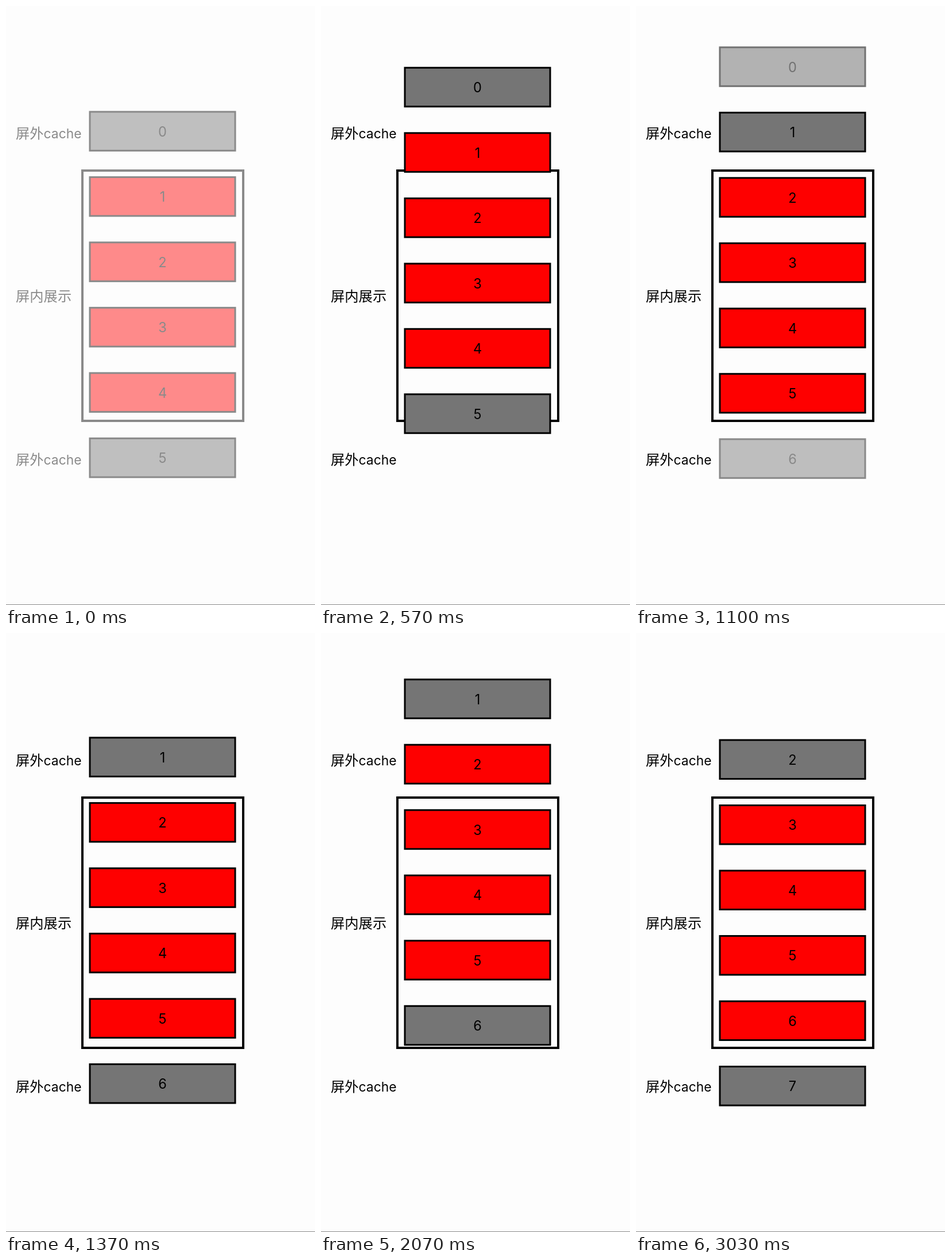
Recreate the animation shown at these times as an HTML page. Size 538 px wide and 1041 px high, loop 3.16 s.

```html
<!DOCTYPE html>
<html lang="zh-CN">
<head>
<meta charset="utf-8">
<title>屏外cache</title>
<style>
  html, body { margin: 0; width: 100%; height: 100%; overflow: hidden; background: #fdfdfd; }
  svg { display: block; width: 538px; height: 1041px; }
  text { font: 24.3px "Noto Sans CJK SC", "Noto Sans CJK", sans-serif; }
  .latin { font: 22.8px Inter, Roboto, sans-serif; }
  .digit { font: 23.6px Inter, Roboto, sans-serif; text-anchor: middle; }
  .cell rect { stroke: #000; stroke-width: 3; }
</style>
</head>
<body>
<svg viewBox="0 0 538 1041" xmlns="http://www.w3.org/2000/svg">
  <g id="scene">
    <text x="17" y="229.5">屏外<tspan class="latin">cache</tspan></text>
    <text x="17" y="513">屏内展示</text>
    <text x="17" y="796.8">屏外<tspan class="latin">cache</tspan></text>
    <rect x="133" y="286" width="280" height="435" fill="none" stroke="#000" stroke-width="4"/>
    <g id="list"></g>
  </g>
  <rect y="1040" width="538" height="1" fill="#888"/>
</svg>
<script>
const LOOP = 3160, TOP = 183.1, PITCH = 113.5, STEP = 112.8, FADE = 320;
const MOVES = [{ start: -50, length: 1000 }, { start: 1262, length: 980 }];
const SWAPS = MOVES.map(m => m.start + m.length);
const RED = '#fe0000', GRAY = '#757575';

const scene = document.getElementById('scene');
const list = document.getElementById('list');

// Sine ease in and out, from 0 to 1
const ease = (t, start, length) => {
  const u = Math.min(1, Math.max(0, (t - start) / length));
  return (1 - Math.cos(Math.PI * u)) / 2;
};

const cells = Array.from({ length: 8 }, (_, i) => {
  const y = TOP + i * PITCH;
  list.insertAdjacentHTML('beforeend',
    `<g class="cell"><rect x="146" y="${y + 1.5}" width="253" height="67.5"/>` +
    `<text class="digit" x="272.5" y="${y + 44.3}">${i}</text></g>`);
  return list.lastElementChild;
});

function opacityOf(i, t) {
  if (i < 2) return 1 - ease(t, SWAPS[i], FADE);
  if (i > 5) return ease(t, SWAPS[i - 6], FADE);
  return 1;
}

function draw(t) {
  const shift = MOVES.reduce((sum, m) => sum + STEP * ease(t, m.start, m.length), 0);
  const first = SWAPS.filter(s => t >= s).length;
  list.setAttribute('transform', `translate(0 ${-shift})`);
  scene.setAttribute('opacity', ease(t, -150, FADE));
  cells.forEach((cell, i) => {
    const onScreen = i > first && i < first + 5;
    cell.firstChild.setAttribute('fill', onScreen ? RED : GRAY);
    cell.setAttribute('opacity', opacityOf(i, t));
  });
}

const begin = performance.now();
function tick() {
  draw((performance.now() - begin) % LOOP);
  requestAnimationFrame(tick);
}
tick();
</script>
</body>
</html>
```
